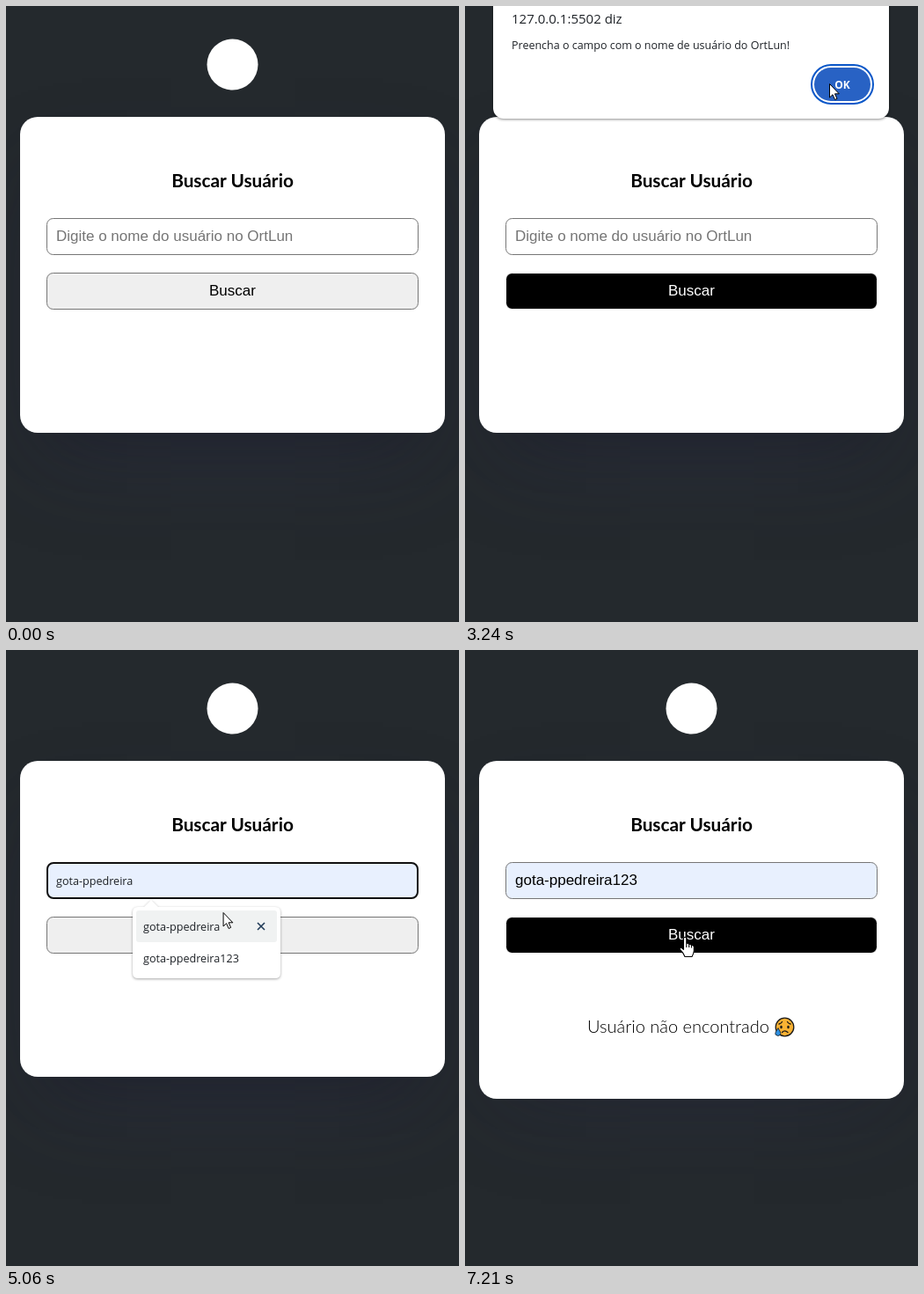
These frames come from a looping animation (515 by 700 pixels, 8000 ms). An HTML page:

```html
<!DOCTYPE html>
<html lang="pt-BR">
<head>
<meta charset="utf-8">
<title>Buscar Usuário</title>
<style>
  html, body { margin: 0; width: 100%; height: 100%; overflow: hidden; background: #24292d; }
  #card {
    position: absolute; left: 16px; top: 126px; width: 483px; height: 359px; border-radius: 20px; background: #fff;
    box-shadow: rgba(50, 50, 93, .25) 0 50px 100px -20px, rgba(0, 0, 0, .3) 0 30px 60px -30px;
  }
  svg { position: absolute; left: 0; top: 0; }
  text { white-space: pre; }
  .form { font: 17px "Liberation Sans", Arial, sans-serif; }
  .brand { font-family: Lato, sans-serif; }
  .ui { font: 12.6px "Open Sans", "Noto Sans", sans-serif; fill: #1f2328; }
  .mid { text-anchor: middle; }
  #dialogBox { filter: drop-shadow(0 1px 1.5px rgba(0, 0, 0, .45)); }
  #bubble { filter: drop-shadow(0 1px 1.5px rgba(0, 0, 0, .35)); }
  #popup { transform-origin: 228px 332px; }
</style>
</head>
<body>
<div id="card"></div>
<svg width="515" height="700" viewBox="0 0 515 700">
  <circle cx="257.5" cy="66.5" r="29" fill="#fff"/>
  <text class="brand mid" x="257.5" y="206" font-size="20.8" font-weight="700">Buscar Usuário</text>

  <rect id="field" rx="7"/>
  <text id="value" x="57" y="267"></text>
  <path id="caret" stroke="#000" d="M0 252V271"/>

  <rect id="button" x="46.5" y="303.5" width="422" height="41" rx="7"/>
  <text id="buttonText" class="form mid" x="257.5" y="329">Buscar</text>

  <g id="result">
    <rect x="16" y="440" width="483" height="70" rx="20" fill="#fff"/>
    <text class="brand" x="139" y="435" font-size="20" font-weight="300">Usuário não encontrado</text>
    <g transform="translate(363.5 428.5)" fill="none" stroke="#1c1a17" stroke-width="1.3" stroke-linecap="round">
      <circle r="10.3" fill="#f9b233"/>
      <path d="M-6.5 -3.5Q-4 -4 -3 -6M6.5 -3.5Q4 -4 3 -6M-3 6Q0 2.6 3.5 6"/>
      <path d="M-4 -.5v1M4 -.5v1" stroke-width="2.4"/>
      <path d="M-7.5 1.5Q-11.5 6 -10.5 8.5Q-7.5 11.5 -4.8 8.5Q-4 6 -7.5 1.5Z" fill="#2e8fe0" stroke-width=".8"/>
    </g>
  </g>

  <g id="popup">
    <path id="bubble" fill="#fff" d="M150 292H157L165 284L173 292H306Q312 292 312 298V367Q312 373 306 373H150Q144 373 144 367V298Q144 292 150 292Z"/>
    <rect id="row" x="148" width="160" height="36" rx="3" fill="#f0f2f2"/>
    <text id="option1" class="ui" x="156" y="319"></text>
    <text id="option2" class="ui" x="156" y="355"></text>
    <path id="remove" d="M-4 -4L4 4M4 -4L-4 4" stroke="#1f3a57" stroke-width="1.6"/>
  </g>

  <g id="dialog">
    <rect id="dialogBox" x="32" y="-40" width="450" height="168" rx="12" fill="#fff"/>
    <text class="ui" x="53" y="20" style="font-size:15px">127.0.0.1:5502 diz</text>
    <text class="ui" x="53" y="49" style="font-size:12.5px">Preencha o campo com o nome de usuário do OrtLun!</text>
    <rect x="394" y="67" width="70" height="44" rx="22" fill="#fff" stroke="#0b57c8" stroke-width="2"/>
    <rect id="ok" x="397" y="70" width="64" height="38" rx="19"/>
    <text class="ui mid" x="429" y="94" style="font-size:12px;font-weight:700;fill:#fff">OK</text>
  </g>

  <g id="cursor" fill="#fff" stroke="#000" stroke-linejoin="round">
    <path id="arrow" d="M.5 .5V16L4 12.7L6.6 18.5L9 17.4L6.5 11.8H11.3Z"/>
    <path id="hand" d="M-1.5 1.5Q0 -.9 1.8 1.5V7.5Q4 6.8 4.7 8.6Q6.8 7.8 7.5 9.6Q9.8 9 10.3 11.2V16Q10 19 8 22.5H0Q-1.5 18.5 -5 15Q-6.8 12.4 -4.4 12L-1.5 14.3ZM1.8 7.5V12M4.7 8.6V12M7.5 9.6V12.5" stroke-width="1.1"/>
    <path id="beam" d="M-3 -8H3M0 -8V8M-3 8H3" fill="none"/>
  </g>
</svg>
<script>
const LOOP = 8000;
const USER = "gota-ppedreira";
const PLACEHOLDER = "Digite o nome do usuário no OrtLun";
const el = Object.fromEntries([...document.querySelectorAll("[id]")].map(node => [node.id, node]));
el.option1.textContent = USER;
el.option2.textContent = USER + "123";

const ease = {
  linear: u => u,
  in: u => u ** 1.6,
  out: u => 1 - (1 - u) ** 1.6,
  both: u => u * u * (3 - 2 * u)
};

// Pointer path: time, x, y, easing of the move that ends here
const path = [
  [315, 474, 705, "linear"], [1140, 370, 352, "out"], [1410, 349, 329, "out"],
  [2470, 349, 329, "linear"], [3240, 414, 88, "both"], [3510, 414, 88, "linear"],
  [3840, 403, 120, "in"], [4320, 258, 262, "both"], [4710, 258, 262, "linear"],
  [5190, 245, 303, "out"], [5450, 245, 303, "linear"], [6060, 236, 344, "both"],
  [6270, 236, 344, "linear"], [6400, 250, 326, "out"]
];

const ramp = (t, start, end) => Math.min(1, Math.max(0, (t - start) / (end - start)));
const within = (v, low, high) => v >= low && v < high;
const set = (node, attrs) => { for (const key in attrs) node.setAttribute(key, attrs[key]); };
const show = (node, visible) => set(node, { opacity: +visible });
const mix = (a, b, u) => `rgb(${a.map((v, i) => Math.round(v + (b[i] - v) * u))})`;
const grey = (a, b, u) => mix([a, a, a], [b, b, b], u);

function pointerAt(t) {
  const i = path.findIndex(key => key[0] > t);
  if (i === 0) return [474, 720];
  if (i < 0) return path[path.length - 1].slice(1, 3);
  const [t0, x0, y0] = path[i - 1], [t1, x1, y1, kind] = path[i];
  const u = ease[kind](ramp(t, t0, t1));
  return [x0 + (x1 - x0) * u, y0 + (y1 - y0) * u];
}

function drawField(t, y) {
  const focused = within(t, 4450, 6610);
  const previewing = within(t, 4780, 6060) && y > 296;
  const chosen = t >= 6060;
  const inset = focused ? 1 : .5;
  set(el.field, {
    x: 46 + inset, y: 241 + inset, width: 423 - 2 * inset, height: 42 - 2 * inset,
    fill: previewing || chosen ? "#e8f0fe" : "#fff",
    stroke: focused ? "#101010" : "#767676", "stroke-width": 2 * inset
  });
  const second = chosen || y > 332;
  el.value.textContent = previewing || chosen ? USER + (second ? "123" : "") : PLACEHOLDER;
  set(el.value, { class: previewing ? "ui" : "form", fill: chosen ? "#000" : "#757575" });
  set(el.caret, { transform: `translate(${chosen ? 196.5 : 57.5} 0)` });
  show(el.caret, within(t, 4450, 4950) || within(t, 6060, 6610));
}

function drawButton(t) {
  const hover = ramp(t, 1170, 1410) - ramp(t, 3560, 3800) + ramp(t, 6290, 6400);
  set(el.button, { fill: grey(239, 0, hover), stroke: grey(118, 255, hover) });
  set(el.buttonText, { fill: grey(0, 255, hover) });
}

function drawPopup(t, y) {
  const closing = ramp(t, 6060, 6210);
  show(el.popup, 0);
  set(el.popup, { opacity: ramp(t, 4410, 4580) * (1 - closing) });
  el.popup.style.transform = `scale(${1 - .04 * closing})`;
  const hovered = y > 296 && t > 4780;
  const offset = y > 332 ? 36 : 0;
  set(el.row, { y: 296 + offset });
  set(el.remove, { transform: `translate(290 ${314 + offset})` });
  show(el.row, hovered);
  show(el.remove, hovered);
}

function drawDialog(t, x, y) {
  set(el.dialog, { opacity: ramp(t, 1690, 1950) - ramp(t, 3540, 3780) });
  const hover = within(x, 397, 461) && within(y, 70, 108);
  set(el.ok, { fill: hover ? "#2862c4" : "#0b50bd" });
}

function drawCursor(t, x, y) {
  const modal = within(t, 2540, 3580);
  const beam = !modal && t > 3580 && within(y, 241, 283);
  const hand = !modal && (within(t, 1180, 2540) && y < 345 || t >= 6300);
  set(el.cursor, { transform: `translate(${x} ${y})` });
  show(el.beam, beam);
  show(el.hand, hand);
  show(el.arrow, !beam && !hand);
}

function render(t) {
  const [x, y] = pointerAt(t);
  drawField(t, y);
  drawButton(t);
  drawPopup(t, y);
  drawDialog(t, x, y);
  drawCursor(t, x, y);
  show(el.result, t >= 7210);
}

const start = performance.now();
function tick() {
  render((performance.now() - start) % LOOP);
  requestAnimationFrame(tick);
}
tick();
</script>
</body>
</html>
```
